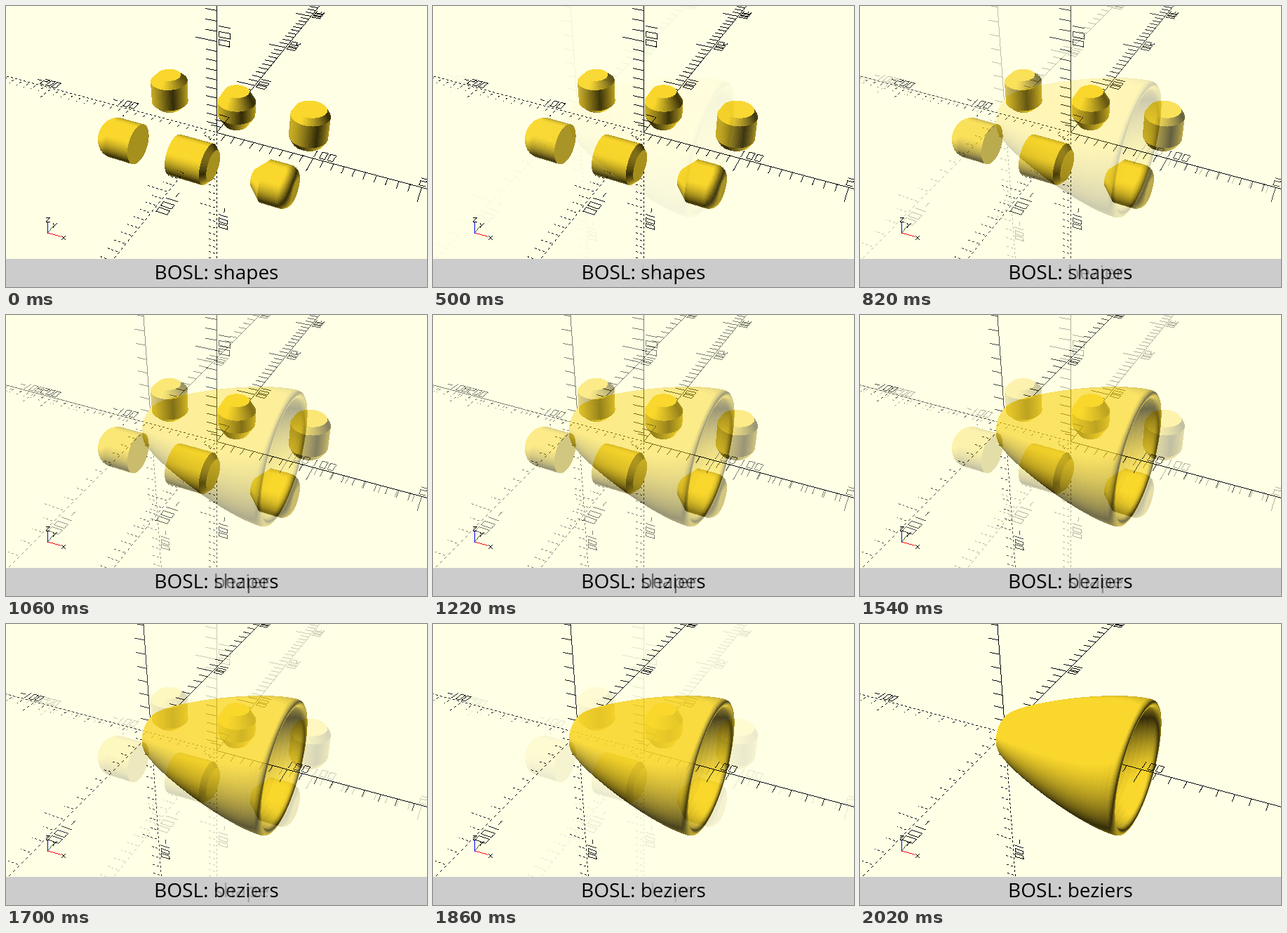
These frames come from a looping animation (600 px wide and 400 px high, 8000 ms). An HTML page with a canvas:

```html
<!DOCTYPE html>
<html lang="en">
<head>
<meta charset="utf-8">
<title>BOSL shapes and beziers</title>
<style>
  html, body { margin: 0; width: 100%; height: 100%; overflow: hidden; background: #ffffe5; }
  .scene { position: absolute; left: 0; top: 0; width: 600px; height: 400px; background: #ffffe5; }
  canvas { display: block; }
  .caption {
    height: 40px; background: #ccc; color: #000; text-align: center; white-space: pre;
    font: 28px/36px "Open Sans", "Noto Sans", sans-serif;
  }
  #beziers { opacity: 0; }
</style>
</head>
<body>
<div class="scene" id="shapes"><canvas width="600" height="360"></canvas><div class="caption">BOSL: shapes</div></div>
<div class="scene" id="beziers"><canvas width="600" height="360"></canvas><div class="caption">BOSL: beziers</div></div>
<script>
const W = 600, H = 360, RAD = Math.PI / 180;
const FOCAL = H / 2 / Math.tan(11.25 * RAD);
const [CX, SX, CZ, SZ] = [Math.cos(55 * RAD), Math.sin(55 * RAD), Math.cos(25 * RAD), Math.sin(25 * RAD)];
const PAPER = [255, 255, 229], GOLD = [249, 215, 44], BLACK = [0, 0, 0];
const LIGHT = [-1, 1, 1].map(v => v / Math.sqrt(3));

const sub = (a, b) => a.map((v, i) => v - b[i]);
const dot = (a, b) => a[0] * b[0] + a[1] * b[1] + a[2] * b[2];
const cross = (a, b) => [a[1] * b[2] - a[2] * b[1], a[2] * b[0] - a[0] * b[2], a[0] * b[1] - a[1] * b[0]];

// A small depth-buffered renderer; depth holds 1 / distance.
class View {
  constructor(canvas, distance, centre) {
    this.ctx = canvas.getContext("2d");
    this.img = this.ctx.createImageData(W, H);
    this.depth = new Float32Array(W * H);
    this.distance = distance;
    this.centre = centre;
    for (let i = 0; i < W * H; i++) this.img.data.set([...PAPER, 255], i * 4);
  }
  eye(p) {
    const [x, y, z] = sub(p, this.centre);
    const u = x * CZ + y * SZ, v = y * CZ - x * SZ;
    return [u, v * CX + z * SX, z * CX - v * SX];
  }
  project(e) {
    const q = 1 / (this.distance - e[2]);
    return [W / 2 + FOCAL * e[0] * q, H / 2 - FOCAL * e[1] * q, q];
  }
  plot(x, y, q, color) {
    if (x < 0 || y < 0 || x >= W || y >= H) return;
    const i = y * W + x;
    if (q <= this.depth[i]) return;
    this.depth[i] = q;
    this.img.data.set(color, i * 4);
  }
  triangle(a, b, c, color) {
    const area = (b[0] - a[0]) * (c[1] - a[1]) - (b[1] - a[1]) * (c[0] - a[0]);
    if (!area) return;
    const span = (k, max) => [
      Math.max(0, Math.floor(Math.min(a[k], b[k], c[k]))),
      Math.min(max - 1, Math.ceil(Math.max(a[k], b[k], c[k])))];
    const [x0, x1] = span(0, W), [y0, y1] = span(1, H);
    for (let y = y0; y <= y1; y++) for (let x = x0; x <= x1; x++) {
      const px = x + 0.5, py = y + 0.5;
      const s = ((px - a[0]) * (c[1] - a[1]) - (py - a[1]) * (c[0] - a[0])) / area;
      const t = ((b[0] - a[0]) * (py - a[1]) - (b[1] - a[1]) * (px - a[0])) / area;
      if (s < 0 || t < 0 || s + t > 1) continue;
      this.plot(x, y, a[2] + s * (b[2] - a[2]) + t * (c[2] - a[2]), color);
    }
  }
  face(points) {
    const e = points.map(p => this.eye(p));
    const n = cross(sub(e[2], e[0]), sub(e[3], e[1]));
    const len = Math.hypot(...n);
    if (len < 1e-9) return;
    const shade = Math.min(1, 0.2 + Math.abs(dot(n, LIGHT)) / len);
    const color = GOLD.map(v => v * shade);
    const [a, b, c, d] = e.map(p => this.project(p));
    this.triangle(a, b, c, color);
    this.triangle(a, c, d, color);
  }
  // Profile points are [along axis, radius].
  revolve(profile, axis, at, sides) {
    const point = ([h, r], k) => {
      const t = k / sides * 2 * Math.PI, c = r * Math.cos(t), s = r * Math.sin(t);
      const p = axis === "x" ? [h, c, s] : [c, s, h];
      return p.map((v, i) => v + at[i]);
    };
    for (let i = 1; i < profile.length; i++) {
      const [p, q] = [profile[i - 1], profile[i]];
      for (let k = 0; k < sides; k++) this.face([point(p, k), point(q, k), point(q, k + 1), point(p, k + 1)]);
    }
  }
  line2d(a, b, color = BLACK, dashed = false) {
    const n = Math.max(1, Math.ceil(Math.max(Math.abs(b[0] - a[0]), Math.abs(b[1] - a[1]))));
    for (let i = 0; i <= n; i++) {
      if (dashed && Math.floor(i / 3) % 2 === 0) continue;
      const [x, y, q] = a.map((v, k) => v + (b[k] - v) * i / n);
      this.plot(Math.floor(x), Math.floor(y), q, color);
    }
  }
  line(p, q, dashed) {
    this.line2d(this.project(this.eye(p)), this.project(this.eye(q)), BLACK, dashed);
  }
  show() { this.ctx.putImageData(this.img, 0, 0); }
}

// Strokes on a glyph box: x from -1 to 1, y from 0 to 2.
const box = [[-1, 2], [1, 2], [-1, 1], [1, 1], [-1, 0], [1, 0], [0, 0], [0, 2]];
const glyphs = {
  "0": ["01540"], "1": ["67"], "2": ["013245"], "3": ["0154", "23"],
  "4": ["023", "15"], "5": ["102354"], "6": ["104532"], "-": ["23"]
};

function drawAxes(view) {
  const reach = view.distance, tick = reach / 60, gap = tick / 4, half = tick / 4, step = tick * 0.75;
  const tall = tick + gap;
  const heights = [gap, tall / 2 + gap, tall];
  const place = [
    (a, o) => [a, o, 0],
    (a, o) => [o, a, 0],
    (a, o) => [o, 0, a]
  ];

  function label(at, axis, sign, value) {
    const pos = place[axis], right = axis ? -1 : 1;
    const chars = [...(sign < 0 ? "-" : "") + value];
    const outward = sign === right;
    chars.forEach((ch, i) => {
      const slot = outward ? i : chars.length - 1 - i;
      const mid = at + sign * slot * step;
      const put = ([x, y]) => pos(mid + right * x * half, heights[y]);
      for (const stroke of glyphs[ch]) {
        for (let k = 1; k < stroke.length; k++) view.line(put(box[stroke[k - 1]]), put(box[stroke[k]]));
      }
    });
  }

  for (let axis = 0; axis < 3; axis++) for (const sign of [1, -1]) {
    const pos = place[axis], dashed = sign < 0;
    view.line(pos(0, 0), pos(sign * reach, 0), dashed);
    for (let v = 10; v < reach; v += 10) {
      const major = v % 100 === 0;
      view.line(pos(sign * v, 0), pos(sign * v, major ? -2 * tick : -tick), dashed);
      if (major) label(sign * v, axis, sign, v);
    }
  }
}

function drawCompass(view) {
  const stroke = (color, ...pts) => {
    for (let i = 1; i < pts.length; i++) view.line2d([...pts[i - 1], 9], [...pts[i], 9], color);
  };
  stroke([0, 0, 255], [59, 323], [59, 308]);
  stroke([60, 110, 20], [59, 323], [67, 313]);
  stroke([255, 0, 0], [59, 323], [77, 328]);
  stroke(BLACK, [57, 301], [62, 301], [57, 307], [62, 307]);
  stroke(BLACK, [67, 309], [69, 312]);
  stroke(BLACK, [72, 309], [67, 315]);
  stroke(BLACK, [79, 327], [84, 332]);
  stroke(BLACK, [79, 332], [84, 327]);
}

// Ends of a cylinder as [along axis, radius], from the cap to the wall.
const R = 20;
const plain = [[R, R]];
const chamfer = (dr, dh = dr) => [[R, R - dr], [R - dh, R]];
const fillet = f => Array.from({ length: 13 }, (_, i) => {
  const t = i / 12 * Math.PI / 2;
  return [R - f + f * Math.cos(t), R - f + f * Math.sin(t)];
});
const cyl = (low, high) => [
  [-R, 0], ...low.map(([h, r]) => [-h, r]),
  ...[...high].reverse(), [R, 0]
];

function bezier(p, steps) {
  const out = [];
  for (let s = 0; s + 3 < p.length; s += 3) for (let i = 0; i <= steps; i++) {
    const t = i / steps, u = 1 - t, w = [u * u * u, 3 * u * u * t, 3 * u * t * t, t * t * t];
    out.push([0, 1].map(k => w.reduce((sum, v, j) => sum + v * p[s + j][k], 0)));
  }
  return out;
}

function drawShapes() {
  const view = new View(document.querySelector("#shapes canvas"), 630, [0, 0, 0]);
  const slope = Math.tan(30 * RAD);
  const ends = [chamfer(7), chamfer(7, 7 / slope), chamfer(7 * slope, 7)];
  ends.forEach((end, i) => view.revolve(cyl(end, end), "z", [80 * (i - 1), 50, 0], 72));
  const mixed = [[fillet(15), plain], [plain, chamfer(5)], [chamfer(12), fillet(10)]];
  mixed.forEach(([low, high], i) => view.revolve(cyl(low, high), "x", [80 * (i - 1), -50, 0], 72));
  drawAxes(view);
  drawCompass(view);
  view.show();
}

function drawBeziers() {
  const view = new View(document.querySelector("#beziers canvas"), 423, [50, 0, 0]);
  const path = [
    [0, 10], [50, 0], [50, 40], [95, 40], [100, 40], [100, 45], [95, 45],
    [66, 45], [0, 20], [0, 12], [0, 12], [0, 10], [0, 10]
  ];
  view.revolve(bezier(path, 32), "x", [0, 0, 0], 180);
  drawAxes(view);
  drawCompass(view);
  view.show();
}

drawShapes();
drawBeziers();

// Crossfade in twentieths, one every 80 ms.
const LOOP = 8000;
document.getElementById("beziers").animate([
  { offset: 0, opacity: 0, easing: "step-end" },
  { offset: 500 / LOOP, opacity: 0.05, easing: "steps(19, end)" },
  { offset: 2020 / LOOP, opacity: 1 },
  { offset: 1, opacity: 1 }
], { duration: LOOP, iterations: Infinity });
</script>
</body>
</html>
```
